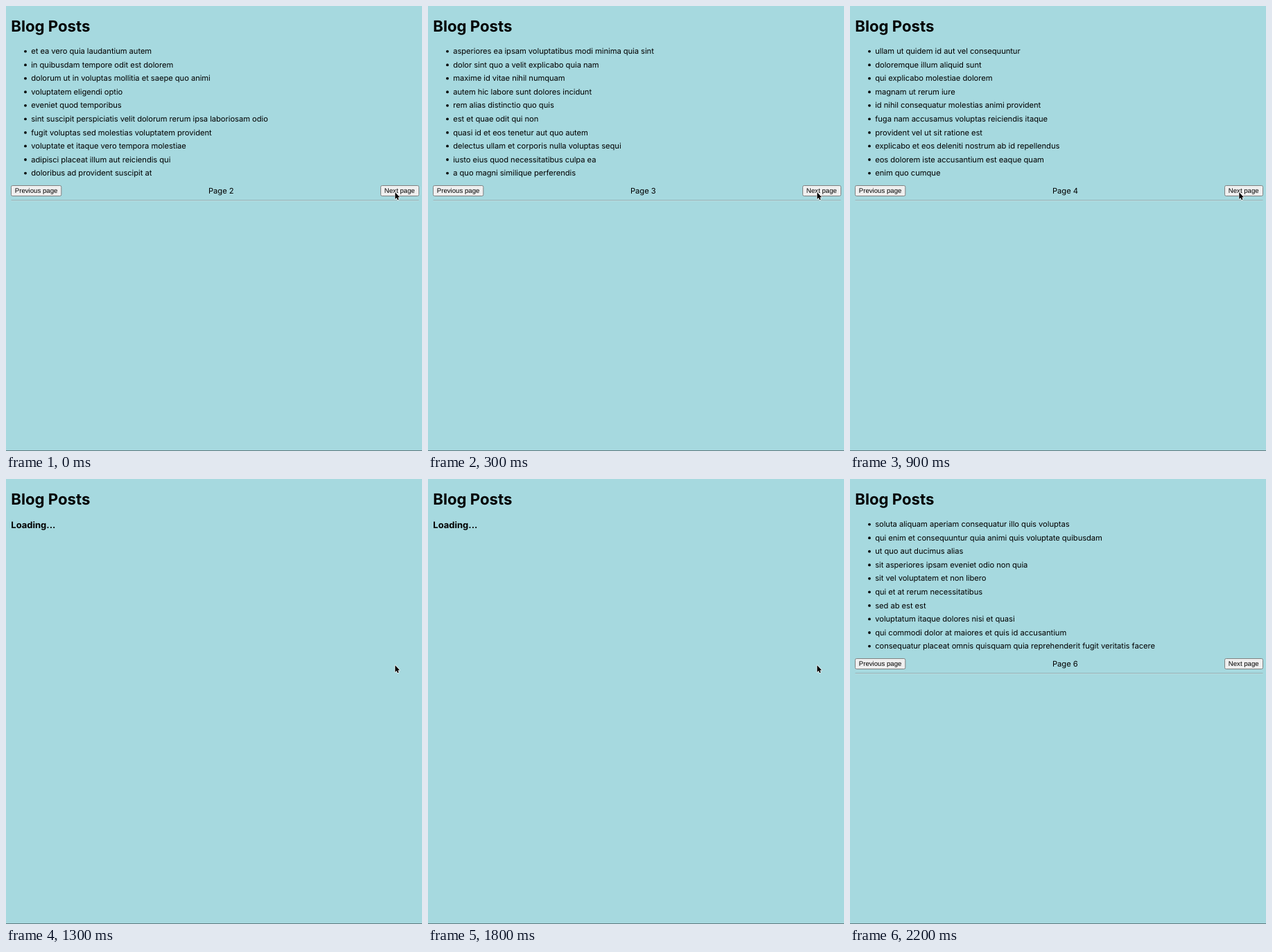
Write an HTML page with a canvas that moves like this. It is 600 px wide and 643 px high and loops after 2800 ms.

```html
<!DOCTYPE html>
<html lang="en">
<head>
<meta charset="utf-8">
<title>Blog Posts</title>
<style>
  html, body { margin: 0; width: 100%; height: 100%; overflow: hidden; background: #a6d9df; }
  canvas { display: block; width: 600px; height: 643px; }
</style>
</head>
<body>
<canvas id="stage"></canvas>
<script>
const W = 600, H = 643, LOOP = 2800;
const SANS = 'Inter, "Open Sans", sans-serif';
const ARIAL = '"Liberation Sans", Arial, sans-serif';

const pages = {
  2: ['et ea vero quia laudantium autem',
      'in quibusdam tempore odit est dolorem',
      'dolorum ut in voluptas mollitia et saepe quo animi',
      'voluptatem eligendi optio',
      'eveniet quod temporibus',
      'sint suscipit perspiciatis velit dolorum rerum ipsa laboriosam odio',
      'fugit voluptas sed molestias voluptatem provident',
      'voluptate et itaque vero tempora molestiae',
      'adipisci placeat illum aut reiciendis qui',
      'doloribus ad provident suscipit at'],
  3: ['asperiores ea ipsam voluptatibus modi minima quia sint',
      'dolor sint quo a velit explicabo quia nam',
      'maxime id vitae nihil numquam',
      'autem hic labore sunt dolores incidunt',
      'rem alias distinctio quo quis',
      'est et quae odit qui non',
      'quasi id et eos tenetur aut quo autem',
      'delectus ullam et corporis nulla voluptas sequi',
      'iusto eius quod necessitatibus culpa ea',
      'a quo magni similique perferendis'],
  4: ['ullam ut quidem id aut vel consequuntur',
      'doloremque illum aliquid sunt',
      'qui explicabo molestiae dolorem',
      'magnam ut rerum iure',
      'id nihil consequatur molestias animi provident',
      'fuga nam accusamus voluptas reiciendis itaque',
      'provident vel ut sit ratione est',
      'explicabo et eos deleniti nostrum ab id repellendus',
      'eos dolorem iste accusantium est eaque quam',
      'enim quo cumque'],
  5: ['non est facere',
      'commodi ullam sint et excepturi error explicabo praesentium voluptas',
      'eligendi iste nostrum consequuntur adipisci praesentium sit beatae perferendis',
      'optio dolor molestias sit',
      'ut numquam possimus omnis eius suscipit laudantium iure',
      'aut quo modi neque nostrum ducimus',
      'quibusdam cumque rem aut deserunt',
      'ut voluptatem illum ea doloribus itaque eos',
      'laborum non sunt aut ut assumenda perspiciatis voluptas',
      'repellendus qui recusandae incidunt voluptates tenetur qui omnis exercitationem'],
  6: ['soluta aliquam aperiam consequatur illo quis voluptas',
      'qui enim et consequuntur quia animi quis voluptate quibusdam',
      'ut quo aut ducimus alias',
      'sit asperiores ipsam eveniet odio non quia',
      'sit vel voluptatem et non libero',
      'qui et at rerum necessitatibus',
      'sed ab est est',
      'voluptatum itaque dolores nisi et quasi',
      'qui commodi dolor at maiores et quis id accusantium',
      'consequatur placeat omnis quisquam quia reprehenderit fugit veritatis facere']
};

// [start time, page number]; page 0 is the loading screen
const schedule = [[0, 2], [100, 0], [300, 3], [700, 0], [900, 4],
                  [1300, 0], [1400, 5], [1800, 0], [2000, 6]];
const CURSOR_GONE = 2200;

const canvas = document.getElementById('stage');
const ctx = canvas.getContext('2d');
const ratio = window.devicePixelRatio || 1;
canvas.width = W * ratio;
canvas.height = H * ratio;
ctx.scale(ratio, ratio);

function text(str, x, y, font, spacing = 0) {
  ctx.font = font;
  ctx.letterSpacing = spacing + 'px';
  ctx.textRendering = 'geometricPrecision'; // unhinted glyphs
  ctx.fillStyle = '#000';
  ctx.fillText(str, x, y);
}

const body = (str, x, y) => text(str, x, y, '11.2px ' + SANS, -0.05);

function button(label, x, w) {
  ctx.beginPath();
  ctx.roundRect(x + 0.5, 259.5, w - 1, 15, 2);
  ctx.fillStyle = '#efefef';
  ctx.fill();
  ctx.strokeStyle = '#767676';
  ctx.lineWidth = 0.9;
  ctx.stroke();
  text(label, x + 5.8, 270.3, '9.65px ' + ARIAL);
}

function drawPage(n) {
  pages[n].forEach((title, i) => {
    const y = 69.2 + i * 19.55;
    ctx.beginPath();
    ctx.arc(28, y - 3.6, 1.9, 0, Math.PI * 2);
    ctx.fillStyle = '#000';
    ctx.fill();
    body(title, 36.2, y);
  });
  button('Previous page', 7, 73.3);
  button('Next page', 540, 56);
  body('Page ' + n, 292, 270.6);
  ctx.fillStyle = '#96b5b9';
  ctx.fillRect(7.5, 280, 588, 1);
  ctx.fillStyle = '#b6d9dd';
  ctx.fillRect(7.5, 281, 588, 1);
}

function drawCursor() {
  const outline = [[0, 0], [0, 9.6], [2.1, 7.7], [3.6, 11], [5.2, 10.3], [3.8, 7.1], [6.6, 7]];
  ctx.beginPath();
  outline.forEach(([x, y]) => ctx.lineTo(561.3 + x, 269.3 + y));
  ctx.closePath();
  ctx.lineJoin = 'round';
  ctx.strokeStyle = '#fff';
  ctx.lineWidth = 1.3;
  ctx.stroke();
  ctx.fillStyle = '#000';
  ctx.fill();
}

function draw(t) {
  const page = schedule.filter(([start]) => start <= t).pop()[1];
  ctx.fillStyle = '#a6d9df';
  ctx.fillRect(0, 0, W, H);
  ctx.fillStyle = '#5f7b7f';
  ctx.fillRect(0, 642, W, 1);
  text('Blog Posts', 7.2, 37.2, 'bold 22.2px ' + SANS);
  if (page) drawPage(page);
  else text('Loading...', 7.3, 71.1, 'bold 13px ' + SANS);
  if (t < CURSOR_GONE) drawCursor();
}

const begin = performance.now();
function tick() {
  draw((performance.now() - begin) % LOOP);
  requestAnimationFrame(tick);
}
tick();
</script>
</body>
</html>
```
